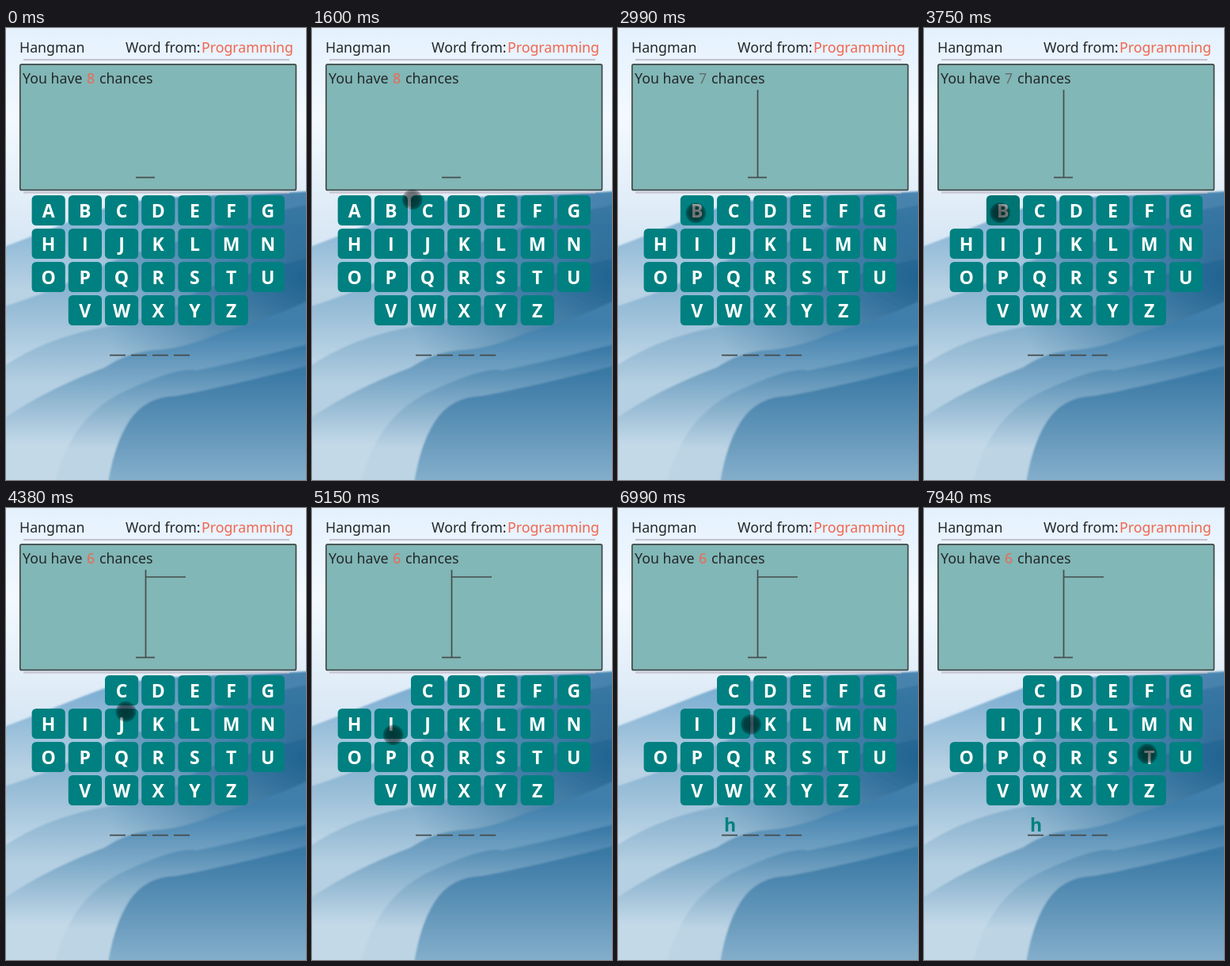
These frames come from a looping animation (379 by 570 pixels, 8000 ms). An HTML page:

```html
<!DOCTYPE html>
<html lang="en">
<head>
<meta charset="utf-8">
<title>Hangman</title>
<style>
  html, body { margin: 0; width: 100%; height: 100%; overflow: hidden; }
  svg { display: block; width: 100%; height: 100%; }
  text { font: 17.75px "Noto Sans", "Open Sans", sans-serif; fill: #24282a; }
  .accent { fill: #f26650; }
  .dim { fill: #65706f; }
  .key text, #hit { font: 700 23px "Open Sans", "Noto Sans", sans-serif; }
  .key text { fill: #fff; text-anchor: middle; }
  .key rect { fill: #008080; }
  .key .tap { fill: #000; opacity: 0; }
  #hit { fill: #008080; }
  .ink { stroke: #454c4c; stroke-width: 1.7; fill: none; }
</style>
</head>
<body>
<svg viewBox="0 0 379 570" preserveAspectRatio="none">
  <defs>
    <linearGradient id="sky" x2="0" y2="1">
      <stop offset="0" stop-color="#e4f1fd"/>
      <stop offset=".2" stop-color="#f3f9ff"/>
      <stop offset=".5" stop-color="#d5e5f3"/>
    </linearGradient>
    <radialGradient id="shade" gradientUnits="userSpaceOnUse" cx="379" cy="320" r="260">
      <stop offset="0" stop-color="#0f5484" stop-opacity=".75"/>
      <stop offset="1" stop-color="#0f5484" stop-opacity="0"/>
    </radialGradient>
    <radialGradient id="touch">
      <stop offset="0" stop-color="#000" stop-opacity=".58"/>
      <stop offset=".65" stop-color="#000" stop-opacity=".5"/>
      <stop offset=".88" stop-color="#000" stop-opacity=".3"/>
      <stop offset="1" stop-color="#000" stop-opacity="0"/>
    </radialGradient>
    <filter id="soft"><feGaussianBlur stdDeviation="1"/></filter>
  </defs>

  <rect width="379" height="570" fill="url(#sky)"/>
  <g id="hills" filter="url(#soft)"></g>

  <path d="M22 40H358M22 207.5H358" stroke="#c6c2d0" stroke-width="2"/>
  <rect x="17.8" y="45.8" width="348.6" height="158.6" rx="2" fill="#81b7b6" stroke="#424a4a" stroke-width="1.7"/>
  <text x="17" y="31">Hangman</text>
  <text x="151" y="31">Word from:</text>
  <text x="247" y="31" class="accent">Programming</text>
  <text x="21" y="70">You have</text>
  <text x="102" y="70" id="count" class="accent">8</text>
  <text x="118" y="70">chances</text>
  <path class="ink" d="M164 188.5H188"/>
  <path class="ink" id="post" d="M176.5 78V188"/>
  <path class="ink" id="beam" d="M176 87H227"/>

  <g id="keys"></g>
  <path class="ink" d="M131 412.7h20m7 0h20m7 0h20m7 0h20"/>
  <text id="hit" x="134" y="408">h</text>
  <circle id="finger" r="13.5" fill="url(#touch)"/>
</svg>

<script>
const LOOP = 8000, STEP = 77, BEND = 1.5;
const $ = id => document.getElementById(id);
const show = (el, on) => el.setAttribute('visibility', on ? 'visible' : 'hidden');

// A ridge rises from left to right and fades from crest colour into mist
function hill(ridge, top, bottom, crest, mist) {
  const id = 'h' + top;
  return `<linearGradient id="${id}" gradientUnits="userSpaceOnUse" x1="0" x2="0" y1="${top}" y2="${bottom}">
    <stop stop-color="${crest}"/><stop offset="1" stop-color="${mist}"/></linearGradient>
    <path d="${ridge}V580H-5Z" fill="url(#${id})"/>`;
}
const range = 'M-5 277Q40 260 78 245T140 222Q200 212 260 211T384 206';
$('hills').innerHTML =
  hill(range, 215, 330, '#74a9cf', '#b9d2e4') +
  hill('M-5 352Q60 332 110 306T200 276Q260 248 384 222', 250, 420, '#5e98c0', '#bdd5e6') +
  hill('M-5 428Q50 390 130 376T230 338Q300 308 384 290', 310, 450, '#5790b8', '#b5d0e2') +
  `<path d="${range}V580H-5Z" fill="url(#shade)"/>` +
  hill('M-5 494Q50 456 125 428Q155 408 190 406T270 385Q330 368 384 343', 375, 525, '#3f7fac', '#c3d9e8') +
  hill('M60 580Q80 490 150 458T240 432Q300 420 384 398', 405, 530, '#3a7aa7', '#bcd4e4') +
  hill('M128 580Q136 525 156 495T215 464Q290 450 384 425', 435, 575, '#3a79a5', '#86b0cc');

const rows = ['ABCDEFG', 'HIJKLMN', 'OPQRSTU', ' VWXYZ'];
$('keys').innerHTML = rows.map((row, r) => [...row].map((ch, c) => {
  if (ch === ' ') return '';
  const box = 'width="42.2" height="38" rx="5.5"';
  return `<g class="key" id="key${ch}" transform="translate(${32.6 + 46.2 * c} ${211 + 42 * r})">
    <rect ${box}/><text x="21" y="28">${ch}</text><rect class="tap" ${box}/></g>`;
}).join('')).join('');

// Finger sweeps: first step, last step, and where it comes to rest
const sweeps = [
  [1060, 1290, 138, 216], [1600, 2370, 53, 229], [2750, 3220, 116, 239],
  [3370, 3600, 96, 233], [4000, 4760, 176, 292], [4840, 5610, 53, 273],
  [5840, 6456, 259, 378], [6533, 6610, 242, 325], [6680, 6990, 168, 273],
  [7067, 7310, 240, 325], [7460, 7710, 263, 301], [7940, 7940, 282, 310]
];
const removed = { A: 2750, B: 4000, H: 5840 };

// Each sweep bends: x eases out while y eases in, in even time steps
function fingerAt(t) {
  let x = 401, y = 583;
  for (const [start, end, toX, toY] of sweeps) {
    if (t < start) break;
    const total = Math.round((end - start) / STEP) + 1;
    const p = Math.min(1, (Math.floor((t - start) / STEP + 0.15) + 1) / total);
    x += (toX - x) * (1 - (1 - p) ** BEND);
    y += (toY - y) * p ** BEND;
  }
  return `translate(${x} ${y})`;
}

function draw(t) {
  for (const ch in removed) {
    const key = $('key' + ch), left = removed[ch] - t;
    show(key, left > 0);
    key.lastElementChild.style.opacity = left > 250 ? 0 : left > 170 ? 0.1 : 0.18;
  }
  const misses = (t >= removed.A) + (t >= removed.B);
  $('count').textContent = 8 - misses;
  $('count').setAttribute('class', misses === 1 ? 'dim' : 'accent');
  show($('post'), misses > 0);
  show($('beam'), misses > 1);
  show($('hit'), t >= removed.H);
  show($('finger'), t >= sweeps[0][0]);
  $('finger').setAttribute('transform', fingerAt(t));
}

const begin = performance.now();
function tick() {
  draw((performance.now() - begin) % LOOP);
  requestAnimationFrame(tick);
}
tick();
</script>
</body>
</html>
```
